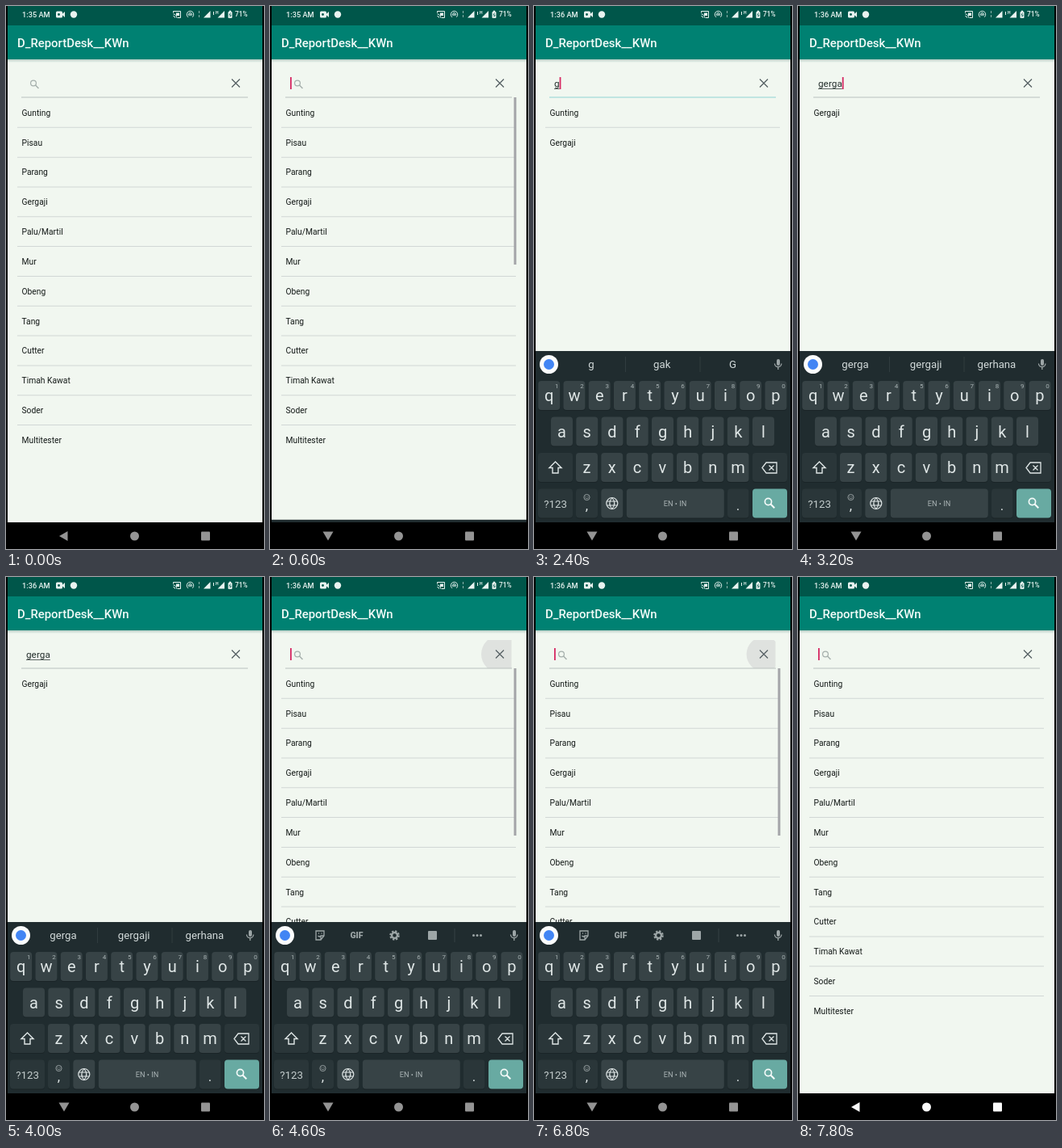
Write an HTML page with a canvas that moves like this. It is 320x672 px and loops after 8 s.

```html
<!DOCTYPE html>
<html lang="id">
<head>
<meta charset="utf-8">
<title>Search list</title>
<style>
  html, body { margin: 0; width: 100%; height: 100%; overflow: hidden; background: #000; }
  canvas { display: block; width: 320px; height: 672px; }
</style>
</head>
<body>
<canvas id="stage"></canvas>
<script>
const canvas = document.getElementById('stage');
const ctx = canvas.getContext('2d');
const scale = window.devicePixelRatio || 1;
canvas.width = 320 * scale;
canvas.height = 672 * scale;

const LOOP = 8000;
const PAGE = '#f1f7f0', ICON = '#9da6a7', LETTER = '#dfe6e6';
const KEYBOARD_IN = 600, KEYBOARD_OUT = 7200, SLIDE = 200;
const ITEMS = ['Gunting', 'Pisau', 'Parang', 'Gergaji', 'Palu/Martil', 'Mur', 'Obeng',
  'Tang', 'Cutter', 'Timah Kawat', 'Soder', 'Multitester'];

// Each edit: time, query, keyboard suggestions
const EDITS = [
  [KEYBOARD_IN, ''],
  [2150, 'g', 'g', 'gak', 'G'],
  [2600, 'ge', 'ge', 'gerak', 'gelas'],
  [2800, 'ger', 'ger', 'gerak', 'gerai'],
  [3000, 'gerg', 'gerg', 'gergaji', 'gerak'],
  [3150, 'gerga', 'gerga', 'gergaji', 'gerhana'],
  [4350, ''],
  [5000, 'm', 'm', 'masih', 'my'],
  [5800, 'mu', 'mu', 'mulai', 'muka'],
  [6000, 'mul', 'mul', 'mulai', 'mula'],
  [6700, '']
];

const clamp = v => Math.max(0, Math.min(1, v));
const easeOut = v => 1 - (1 - clamp(v)) ** 3;

function text(str, x, y, size, color, align = 'left', weight = 400) {
  ctx.font = `${weight} ${size}px Roboto, sans-serif`;
  ctx.textAlign = align;
  ctx.fillStyle = color;
  ctx.fillText(str, x, y);
}
function rect(x, y, w, h, color, radius = 0) {
  ctx.fillStyle = color;
  ctx.beginPath();
  ctx.roundRect(x, y, w, h, radius);
  ctx.fill();
}
function disc(x, y, r, color) {
  ctx.fillStyle = color;
  ctx.beginPath();
  ctx.arc(x, y, r, 0, 7);
  ctx.fill();
}
function shape(d, color) {
  ctx.fillStyle = color;
  ctx.fill(new Path2D(d));
}
function stroke(d, color, width = 1) {
  ctx.strokeStyle = color;
  ctx.lineWidth = width;
  ctx.stroke(new Path2D(d));
}
function ring(x, y, r, color, width = 1, from = 0, to = Math.PI * 2) {
  ctx.strokeStyle = color;
  ctx.lineWidth = width;
  ctx.beginPath();
  ctx.arc(x, y, r, from, to);
  ctx.stroke();
}
function magnifier(x, y, r, color, width) {
  ring(x, y, r, color, width);
  const a = r * .75, b = r * 1.9;
  stroke(`M${x + a} ${y + a}L${x + b} ${y + b}`, color, width * 1.2);
}

function drawStatusBar(t) {
  const white = '#e9f3f0';
  rect(2, 0, 316, 24, '#00564a');
  text(t < 1800 ? '1:35 AM' : '1:36 AM', 20, 13.5, 9.2, white, 'left', 500);
  rect(62, 6.5, 8, 8, white, 1.5);
  shape('M69 10.5l4-3.5v7z', white);
  disc(65.5, 10.5, 1.4, '#00564a');
  disc(84, 10.5, 4.2, white);
  stroke('M207.5 8.5v-2h9v8h-4M207.5 10a4.5 4.5 0 0 1 4 4.5M207.5 12.5a2 2 0 0 1 2 2', white);
  rect(211, 8.5, 4, 3.5, white);
  ring(228.5, 10.5, 4.2, white, 1, 2.2, 7.2);
  ring(228.5, 10.5, 2, white, 1, 2.2, 7.2);
  disc(228.5, 10.8, 1, white);
  rect(239, 6, 1, 3, '#8fb5ae');
  rect(239, 11, 1, 3, '#8fb5ae');
  shape('M245 14.5l8.5-8.5v8.5zM262.5 14.5l8.5-8.5v8.5z', white);
  text('H', 260, 10, 5, white, 'left', 700);
  rect(257, 7, 1, 4, white);
  rect(275.5, 7, 5, 8, white, 1);
  rect(276.8, 5.7, 2.4, 2, white);
  stroke('M278.5 8.5l-1.5 2.7h2.2l-1.5 2.5', '#00564a', .8);
  text('71%', 284, 13.4, 8.4, white, 'left', 500);
}

function drawPage(t, edit, since, keyboardShown) {
  const query = edit[1];
  const focused = t >= KEYBOARD_IN;
  rect(2, 24, 316, 615, PAGE);
  const shadow = ctx.createLinearGradient(0, 66, 0, 70);
  shadow.addColorStop(0, '#b9cdc6');
  shadow.addColorStop(1, PAGE);
  rect(2, 66, 316, 4, shadow);
  rect(2, 24, 316, 42, '#008172');
  text('D_ReportDesk__KWn', 14, 50.5, 14.9, '#f2fbf8', 'left', 500);

  if (!query && focused) drawRipple(since);
  stroke('M280 90.5l10 10M290 90.5l-10 10', '#566064', 1.3);
  rect(19, 112.6, 281, 1, query === 'g' ? '#8fd3d4' : '#b9c2bf');

  let caretX = 25;
  if (query) {
    text(query, 25, 100, 11.8, '#26302e');
    const width = ctx.measureText(query).width;
    rect(25, 102, width, .9, '#4c5553');
    caretX += width;
  } else {
    magnifier(34, 95.5, 3.4, '#a5afac', 1.2);
  }
  if (focused && since % 1000 < 500) rect(caretX, 88, 1.8, 15, '#d62862');

  const matches = ITEMS.filter(item => item.toLowerCase().startsWith(query));
  matches.forEach((item, i) => {
    const y = 135.7 + i * 36.83;
    text(item, 19.5, y, 10.3, '#141a18');
    if (i < matches.length - 1) rect(14, y + 14.1, 291, 1, '#d1d7d5');
  });

  if (!query && keyboardShown) {
    ctx.globalAlpha = clamp((900 - since) / 250);
    rect(302.5, 113, 3, 207, '#a3a4a8');
    ctx.globalAlpha = 1;
  }
}

function drawRipple(since) {
  const isClear = since < 600;
  if (!isClear || currentEdit() === EDITS[0]) return;
  ctx.save();
  ctx.beginPath();
  ctx.rect(258, 78, 41.5, 35);
  ctx.clip();
  ctx.globalAlpha = clamp((600 - since) / 200);
  disc(285, 95.5, 10 + 13 * easeOut(since / 200), '#dfe2df');
  ctx.restore();
}

function key(x, y, w, color = '#374346') {
  rect(x, y + 1, w, 36, '#1a2427', 4);
  rect(x, y, w, 36, color, 4);
}

function drawTools() {
  stroke('M57 438h10v6l-4 5h-6zM67 444h-4v5M59.5 444q2 2 4 0M60 441h1M63.5 441h1', ICON, 1.3);
  text('GIF', 107.5, 447.3, 10.5, ICON, 'center', 900);
  ctx.setLineDash([2.3, 1.84]);
  ring(154.5, 443.5, 5.27, ICON, 2);
  ctx.setLineDash([]);
  ring(154.5, 443.5, 3.5, ICON, 2.4);
  rect(196, 438, 11, 11, ICON, 1);
  rect(228.5, 435, 1, 17, '#354144');
  [252.5, 257, 261.5].forEach(x => disc(x, 443.5, 1.5, ICON));
}

function drawKeyboard(edit) {
  const dim = '#2a3639';
  rect(2, 427, 316, 212, '#202c2f');
  disc(18.5, 443.5, 11.5, '#fbfcfc');
  disc(18.5, 443.5, 6.5, '#4285f4');
  if (edit[1]) {
    edit.slice(2).forEach((word, i) => text(word, 71 + i * 87.7, 448, 13.2, '#d3dbdb', 'center'));
    rect(113, 434, 1, 19, '#303c3f');
    rect(205.5, 434, 1, 19, '#303c3f');
  } else {
    drawTools();
  }
  rect(301, 437, 4, 8, ICON, 2);
  stroke('M298.5 442.5a4.2 4.2 0 0 0 8.4 0M302.8 447v3', ICON, 1.3);

  [['qwertyuiop', 5.2, 464], ['asdfghjkl', 21, 508.5], ['zxcvbnm', 52, 553]].forEach(([row, left, y], r) => {
    [...row].forEach((letter, i) => {
      const x = left + i * 31.25;
      key(x, y, 27);
      text(letter, x + 13.5, y + 25, 20, LETTER, 'center');
      if (r === 0) text((i + 1) % 10, x + 23, y + 9, 8, '#aab4b5', 'center');
    });
  });

  key(5, 553, 43, dim);
  stroke('M26.5 564l-7.5 7.5h4v6.5h7v-6.5h4z', LETTER, 1.4);
  key(271, 553, 43, dim);
  stroke('M283 571.5l5-6.5h13v13h-13zM291.5 568.5l6 6M297.5 568.5l-6 6', LETTER, 1.3);

  key(5, 597.5, 43, dim);
  text('?123', 26.5, 620.5, 13.3, '#c4cdcd', 'center');
  key(52, 597.5, 27, dim);
  ring(65.5, 608, 3.6, ICON, .9);
  ring(65.5, 608, 1.8, ICON, .8, .2, 2.9);
  disc(64.2, 607, .6, ICON);
  disc(66.8, 607, .6, ICON);
  text(',', 65.5, 624, 17, LETTER, 'center');
  key(83.3, 597.5, 27);
  ring(96.8, 615.5, 7, LETTER, 1.2);
  stroke('M90.5 613h12.6M90.5 618h12.6M96.8 608.5q-6 7 0 14q6 -7 0 -14', LETTER, 1.1);
  key(114.8, 597.5, 121);
  text('EN • IN', 175, 619, 9.2, '#a9b3b4', 'center');
  key(240, 597.5, 26.5, dim);
  text('.', 253, 624, 17, LETTER, 'center');
  key(271, 597.5, 43, '#68aaa2');
  magnifier(290.5, 613.5, 4.1, '#f4faf9', 1.7);
}

function drawNavigation(t, keyboardShown) {
  rect(0, 639, 320, 33, '#000');
  const color = t > KEYBOARD_OUT ? '#fafafa' : '#949494';
  shape(keyboardShown ? 'M65.5 650.5h13l-6.5 11z' : 'M66 656l10.5-6v12z', color);
  disc(159.5, 656, 5.5, color);
  rect(242, 650.5, 11, 11, color, 1);
}

let now = 0;
const currentEdit = () => EDITS.filter(edit => edit[0] <= now).pop() || [0, ''];

function draw(t) {
  now = t;
  const edit = currentEdit();
  const keyboardShown = t >= KEYBOARD_IN && t < KEYBOARD_OUT + SLIDE;
  ctx.setTransform(scale, 0, 0, scale, 0, 0);
  rect(0, 0, 320, 672, '#000');
  drawPage(t, edit, t - edit[0], keyboardShown);
  drawStatusBar(t);
  if (keyboardShown) {
    const hidden = 1 - easeOut((t - KEYBOARD_IN) / SLIDE) + clamp((t - KEYBOARD_OUT) / SLIDE) ** 2;
    ctx.save();
    ctx.translate(0, 212 * hidden);
    drawKeyboard(edit);
    ctx.restore();
  }
  drawNavigation(t, keyboardShown);
}

function tick() {
  draw(performance.now() % LOOP);
  requestAnimationFrame(tick);
}
tick();
</script>
</body>
</html>
```
